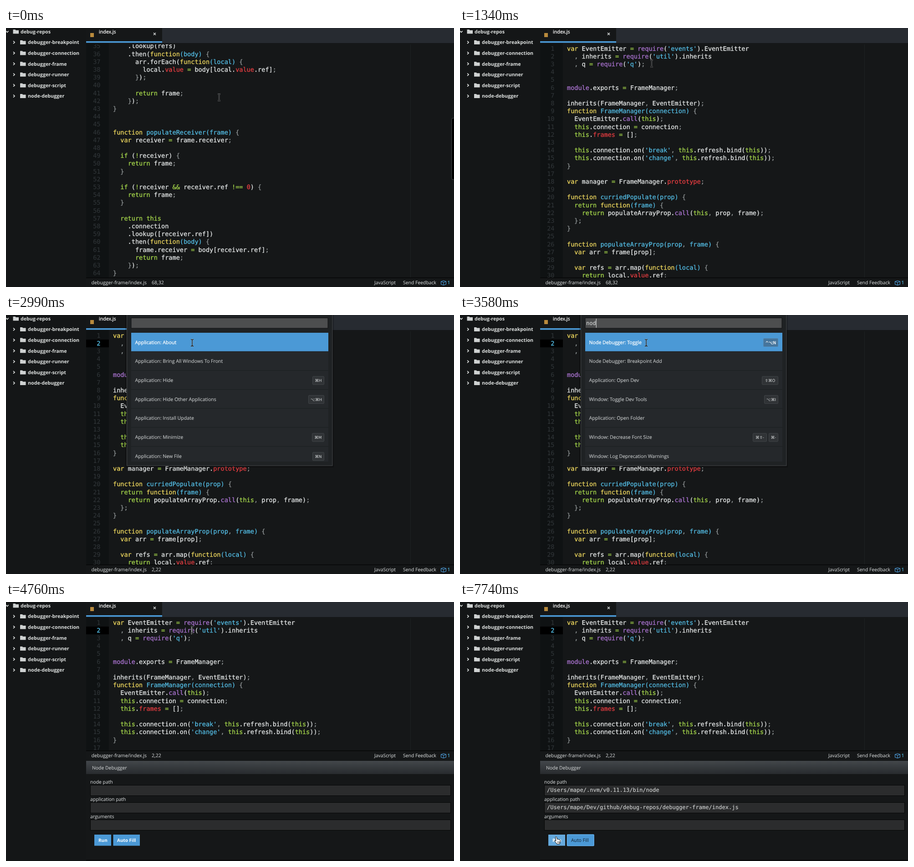
Write an HTML page that moves like this. It is 984 px wide and 569 px high and loops after 8 s.

```html
<!DOCTYPE html>
<html lang="en">
<head>
<meta charset="utf-8">
<title>Editor with debugger panel</title>
<style>
  html, body { margin: 0; height: 100%; overflow: hidden; background: #151718; }
  svg { display: block; width: 100vw; height: 100vh; }
  text, tspan { fill: currentColor; stroke: currentColor; stroke-width: .15px; }
  text { font: 10.6px "Open Sans", "Noto Sans", sans-serif; color: #c4c7c8; white-space: pre; text-rendering: geometricPrecision; }
  .code, .code tspan { stroke-width: .3px; }
  .code { font: 13.56px "DejaVu Sans Mono", monospace; color: #e6e9e9; }
  .field { font: 12.05px "DejaVu Sans Mono", monospace; color: #d0d2d2; }
  .tree { font-size: 10.7px; font-weight: 700; color: #dde0df; stroke-width: 0; }
  .label { font-size: 10.4px; }
  .button { font-size: 10px; font-weight: 700; color: #fff; stroke-width: 0; }
  .focused { font-size: 10.4px; color: #1f3447; }
  .key { font: 8.6px "DejaVu Sans", sans-serif; text-anchor: middle; }
  .selected { color: #fff; stroke-width: .3px; }
  .end { text-anchor: end; }
  .number { color: #303538; stroke-width: .1px; }
  .active, .blue { color: #54bee6; }
  .yellow { color: #f0d95f; }
  .green { color: #a8da4c; }
  .purple { color: #ad75d4; }
  .red { color: #e63d41; }
  .gray { color: #8f9495; }
</style>
</head>
<body>
<svg id="stage" viewBox="0 0 984 569" preserveAspectRatio="none"></svg>
<script>
const LOOP = 8000, LINE = 17.2, BLUE = '#4b99d6';

const source = `var EventEmitter = require('events').EventEmitter
  , inherits = require('util').inherits
  , q = require('q');


module.exports = FrameManager;

inherits(FrameManager, EventEmitter);
function FrameManager(connection) {
  EventEmitter.call(this);
  this.connection = connection;
  this.frames = [];

  this.connection.on('break', this.refresh.bind(this));
  this.connection.on('change', this.refresh.bind(this));
}

var manager = FrameManager.prototype;

function curriedPopulate(prop) {
  return function(frame) {
    return populateArrayProp.call(this, prop, frame);
  };
}

function populateArrayProp(prop, frame) {
  var arr = frame[prop];

  var refs = arr.map(function(local) {
    return local.value.ref;
  });

  return this
    .connection
    .lookup(refs)
    .then(function(body) {
      arr.forEach(function(local) {
        local.value = body[local.value.ref];
      });

      return frame;
    });
}


function populateReceiver(frame) {
  var receiver = frame.receiver;

  if (!receiver) {
    return frame;
  }

  if (!receiver && receiver.ref !== 0) {
    return frame;
  }

  return this
    .connection
    .lookup([receiver.ref])
    .then(function(body) {
      frame.receiver = body[receiver.ref];
      return frame;
    });
}`.split('\n');

const folders = ['debugger-breakpoint', 'debugger-connection', 'debugger-frame',
  'debugger-runner', 'debugger-script', 'node-debugger'];

// Command label, then its key bindings from right to left as [keys, box width]
const commands = {
  all: [
    ['Application: About'],
    ['Application: Bring All Windows To Front'],
    ['Application: Hide', ['⌘H', 25]],
    ['Application: Hide Other Applications', ['⌥⌘H', 34]],
    ['Application: Install Update'],
    ['Application: Minimize', ['⌘M', 26]],
    ['Application: New File', ['⌘N', 25]]],
  n: [
    ['Application: New File', ['⌘N', 25]],
    ['Application: New Window', ['⇧⌘N', 34]],
    ['Node Debugger: Toggle', ['^⌥N', 32]],
    ['Application: Minimize', ['⌘M', 26]],
    ['Application: Open', ['⌘O', 25]],
    ['Application: Install Update'],
    ['Node Debugger: Breakpoint Add']],
  node: [
    ['Node Debugger: Toggle', ['^⌥N', 32]],
    ['Node Debugger: Breakpoint Add'],
    ['Application: Open Dev', ['⇧⌘O', 35]],
    ['Window: Toggle Dev Tools', ['⌥⌘I', 30]],
    ['Application: Open Folder'],
    ['Window: Decrease Font Size', ['⌘-', 20], ['⌘⇧-', 30]],
    ['Window: Log Deprecation Warnings']]
};

// [start, value...] lists; the last entry already started applies
const mouseSteps = [
  [0, 468, 152.5, 'beam'], [900, 464, 146, 'beam'], [1050, 446, 116, 'beam'],
  [1200, 421, 78, 'beam'], [1350, 407, 61, 'beam'], [1490, 409, 61, 'beam'],
  [5800, 405, 84, 'beam'], [5950, 372, 190, 'beam'], [6100, 310, 350, 'arrow'],
  [6250, 262, 452, 'beam'], [6390, 232, 507, 'arrow'], [6540, 250, 532, 'hand'],
  [6690, 258, 534, 'hand'], [7590, 224, 527, 'hand'], [7740, 214, 524, 'hand']];
const scrollSteps = [[0, 590], [150, 200], [300, 0]];
const barSteps = [[0, 1], [900, .6], [1050, .25], [1200, 0]];
const querySteps = [[0, ''], [3140, 'n'], [3430, 'no'], [3580, 'nod'], [3730, 'node']];
const caretSteps = [[0, 0], [1940, 1], [2390, 0], [4760, 1], [5350, 0], [5800, 1],
  [6250, 0], [6690, 1], [6990, 0]];

const at = (steps, t) => steps.findLast(step => step[0] <= t).slice(1);
const escape = s => s.replace(/&/g, '&amp;');
const rect = (x, y, w, h, fill, more = '') =>
  `<rect x="${x}" y="${y}" width="${w}" height="${h}" fill="${fill}" ${more}/>`;
const text = (x, y, content, cls = '') => `<text x="${x}" y="${y}" class="${cls}">${content}</text>`;
const path = (d, more) => `<path d="${d}" ${more}/>`;
const group = (x, y, content) => `<g transform="translate(${x} ${y})">${content}</g>`;

const token = new RegExp([
  /(?<blue>'[^']*'|(?<=function|function[ (][^)]*)[\w()]+)/,
  /(?<yellow>\b(?:var|function)\b)/,
  /(?<green>\b(?:return|if|this)\b|&&|!==|[=!])/,
  /(?<purple>\b(?:require|call|module)\b)/,
  /(?<red>(?<=\.)(?:frames|value|prototype)\b|\b\d+\b)/,
  /(?<gray>[{};,])/
].map(r => r.source).join('|'), 'g');

const highlight = line => line.replace(token, (match, ...rest) => {
  const groups = rest.at(-1);
  const color = Object.keys(groups).find(name => groups[name]);
  return `<tspan class="${color}">${escape(match)}</tspan>`;
});

const codeLines = source.map(highlight);

function sidebar() {
  const folder = (x, y) =>
    path(`M${x} ${y - 4.5}h5l1 1.5h6.5v7.5h-12.5z`, 'fill="#cfd2d2"');
  const chevron = d => path(d, 'fill="none" stroke="#dde0df" stroke-width="1.7"');
  return rect(0, 0, 176, 569, '#141617')
    + chevron('M0 6.5l2.8 3 2.8-3') + folder(15.5, 8) + text(32, 12, 'debug-repos', 'tree')
    + folders.map((name, i) => {
      const y = 31.5 + 23.6 * i;
      return chevron(`M16 ${y - 2.8}l3 2.8-3 2.8`) + folder(31, y) + text(48, y + 3.8, name, 'tree');
    }).join('');
}

function tabs() {
  return rect(176, 0, 808, 33, '#272b31') + rect(176, 0, 167, 33, '#151718')
    + rect(176, 29, 167, 3.5, BLUE) + rect(185, 11, 8, 9, '#b98a3c')
    + text(204, 12, 'index.js', 'selected')
    + path('M324 10.5l5 5m0-5l-5 5', 'stroke="#d4d7d7" stroke-width="1.5"');
}

function editor(t, bottom) {
  const [scroll] = at(scrollSteps, t), [barOpacity] = at(barSteps, t), [caret] = at(caretSteps, t);
  const clicked = t >= 1940;
  const rows = codeLines.map((line, i) => {
    const y = 49.6 + LINE * i - scroll;
    if (y < 30 || y > bottom + 16) return '';
    const active = clicked && i === 1 ? 'active' : 'number';
    return text(207.5, y, i + 1, `code end ${active}`) + text(235, y, line, 'code');
  }).join('');
  return `<clipPath id="view"><rect x="176" y="36" width="808" height="${bottom - 36}"/></clipPath>`
    + rect(176, 33, 808, bottom - 33, '#151718') + rect(176, 33, 50, bottom - 33, '#0f1213')
    + (clicked ? rect(176, 54, 50, 17, '#000') : '')
    + rect(888, 36, 1, bottom - 36, '#1e2122')
    + `<g clip-path="url(#view)">${rows}</g>`
    + (caret ? rect(407, 54, 1, 17, '#d8dada') : '')
    + rect(978.5, 38 + scroll * 160 / 590, 9, 135, '#000',
      `rx="3.5" stroke="#45494b" opacity="${barOpacity}"`);
}

function statusBar(y, position) {
  const box = 'M955.5 9l5.5-2 5.5 2v6l-5.5 2-5.5-2zl5.5 2 5.5-2m-5.5 2v6';
  return group(0, y, rect(176, 0, 808, 21, '#151718') + rect(176, 0, 808, 1.5, '#060707')
    + text(187.5, 15.3, 'debugger-frame/index.js') + text(320, 15.3, position)
    + text(856, 15.3, 'JavaScript', 'label end') + text(945, 15.3, 'Send Feedback', 'label end')
    + path(box, `fill="none" stroke="${BLUE}" stroke-width="1.1"`) + text(969.5, 15.3, '1', 'active'));
}

function debuggerPanel(t) {
  const focused = t >= 6990, filled = t >= 7140;
  const hoverFill = t >= 6540 && t < 7590, hoverRun = t >= 7590;
  const home = '/Users/mape/';
  const fields = [['node path', home + '.nvm/v0.11.13/bin/node'],
    ['application path', home + 'Dev/github/debug-repos/debugger-frame/index.js'],
    ['arguments', '']];
  const color = hover => hover ? '#65a9dd' : BLUE;
  return `<linearGradient id="heading" x2="0" y2="1"><stop stop-color="#43474b"/>
      <stop offset="1" stop-color="#282b2e"/></linearGradient>`
    + rect(176, 348, 808, 221, '#151718') + rect(176, 349, 808, 29, 'url(#heading)')
    + text(189, 368, 'Node Debugger', 'label')
    + fields.map(([label, value], i) => group(0, 38 * i,
      text(185, 398.7, label, 'label')
      + rect(185.5, 402.5, 791, 23, '#2b2c2d', 'stroke="#050606"')
      + (filled ? text(191, 417.3, value, 'field') : ''))).join('')
    + rect(194, 511, 37, 24.5, color(hoverRun)) + text(203, 527.3, 'Run', 'button')
    + rect(235.5, 511, 58.5, 24.5, color(hoverFill),
      focused ? 'rx="1" stroke="#62b1f0" stroke-width="1.6"' : '')
    + text(244, 527.3, 'Auto Fill', focused ? 'focused' : 'button')
    + rect(176, 566, 808, 3, '#0c0d0e');
}

function palette(t) {
  const [query] = at(querySteps, t);
  const caretOn = t >= 3140 && !(t >= 4170 && t < 4620);
  const list = commands[query.length > 1 ? 'node' : query || 'all'];
  const rows = list.map(([label, ...keys], i) => {
    const y = 39 + 41.7 * i, selected = i === 0;
    let right = 698.5;
    const bindings = keys.map(([keyText, width]) => {
      const x = right - width;
      right = x - 5;
      return rect(x, y + 12.5, width, 18, selected ? '#46759c' : '#303336',
        `rx="1.5" stroke="${selected ? '#5287b1' : '#414548'}"`)
        + text(x + width / 2, y + 24.7, keyText, selected ? 'key selected' : 'key');
    }).join('');
    return rect(275, y, 433, 40.7, selected ? BLUE : '#25282b')
      + text(283.5, y + 24.6, label, selected ? 'selected' : '') + bindings;
  }).join('');
  return rect(262, -2, 458, 337, '#000', 'opacity=".25"')
    + rect(265.5, -2, 451.5, 333, '#1f2224', 'stroke="#45494b"')
    + rect(275, 6.5, 432, 22.5, '#4d4e4f', 'stroke="#101112"')
    + text(277, 22.3, query, 'field')
    + (caretOn ? rect(277 + 7.25 * query.length, 8, 1, 20, '#eee') : '')
    + '<clipPath id="list"><rect x="275" y="39" width="433" height="283"/></clipPath>'
    + rect(275, 39, 433, 283, '#1b1e20') + `<g clip-path="url(#list)">${rows}</g>`;
}

const pointers = {
  beam: () => {
    const d = 'M-3-7.5q3 0 3 2v11q0 2-3 2m6-15q-3 0-3 2m0 11q0 2 3 2';
    return path(d, 'fill="none" stroke="#a4a8aa" stroke-width="2.4" stroke-opacity=".75"')
      + path(d, 'fill="none" stroke="#0a0a0a" stroke-width="1.1"');
  },
  arrow: () => path('M-5-8v14l3.2-3 2.3 5.2 2.2-1-2.2-5h4.5z', 'fill="#000" stroke="#fff"'),
  hand: () => path('M-4.5-7.5c1-1.3 2.6-.6 3 .8l1 4c1-.8 2-.4 2.4.4c1-.6 1.9-.2 2.3.7c1.2-.4 2 .2 2 1.4v2.5'
    + 'c0 2-1 3.2-1.3 5.4h-6.3c-.7-2.4-3.6-4.2-4.8-7c.5-1.2 1.8-.9 3 .5z', 'fill="#fff" stroke="#000"')
    + path('M.4 2.2v3m2 -3v3m2-3v3', 'stroke="#000" stroke-width=".8"')
};

function scene(t) {
  const panelOpen = t >= 4760, bottom = panelOpen ? 326 : 548;
  const [x, y, pointer] = at(mouseSteps, t);
  return sidebar() + editor(t, bottom) + tabs()
    + statusBar(bottom, t >= 1940 ? '2,22' : '68,32')
    + (panelOpen ? debuggerPanel(t) : '')
    + (t >= 2990 && !panelOpen ? palette(t) : '')
    + group(x, y, pointers[pointer]());
}

const stage = document.getElementById('stage');
let shown = '';
function tick() {
  const markup = scene(performance.now() % LOOP);
  if (markup !== shown) stage.innerHTML = shown = markup;
  requestAnimationFrame(tick);
}
tick();
</script>
</body>
</html>
```
